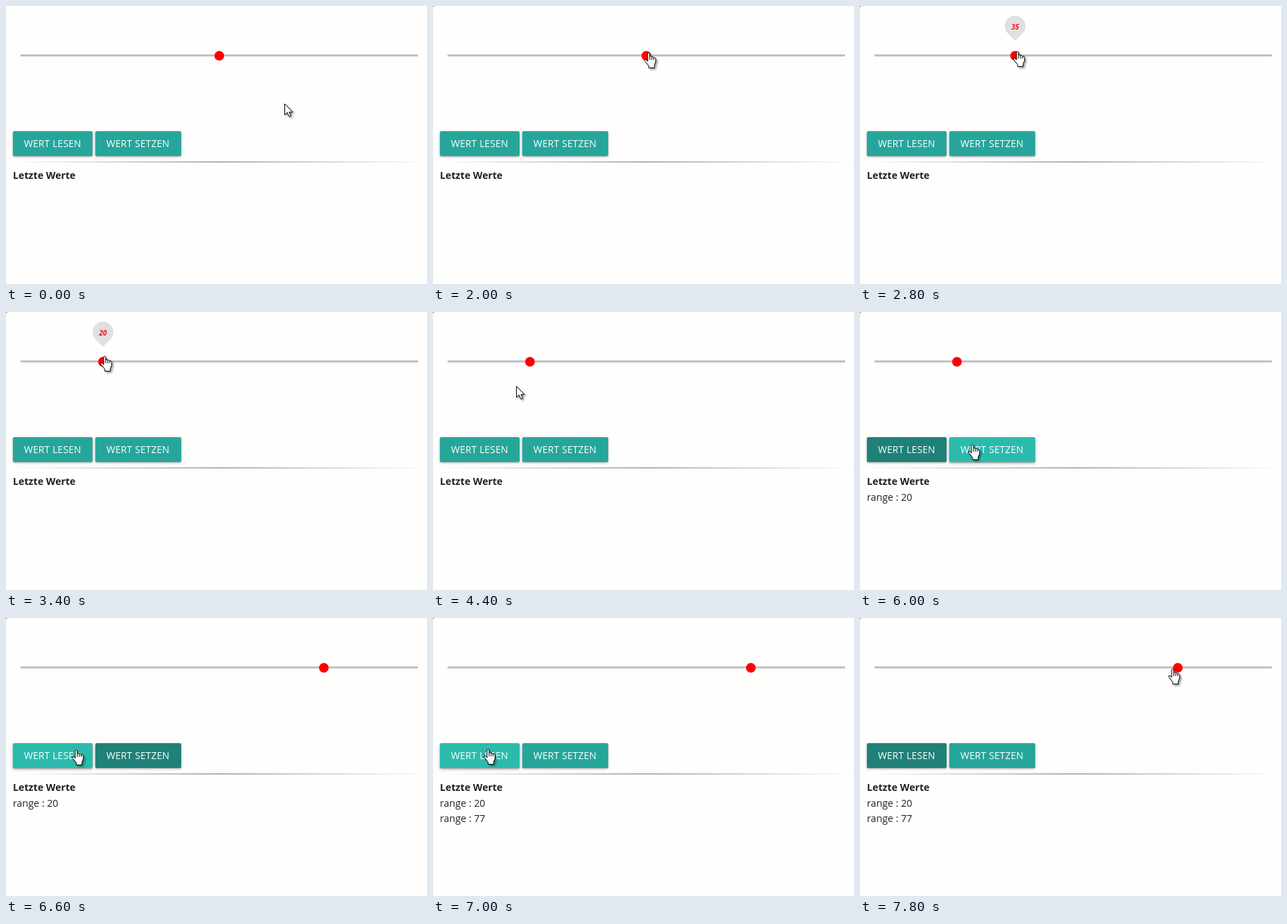
Recreate the animation shown at these times as an HTML page. Size 608x402 px, loop 8 s.

```html
<!DOCTYPE html>
<html lang="de">
<head>
<meta charset="utf-8">
<title>Schieberegler</title>
<style>
  html, body { margin: 0; width: 100%; height: 100%; overflow: hidden; background: #fefefd; }
  svg { display: block; width: 608px; height: 402px; font-family: "Open Sans", "Noto Sans", sans-serif; }
  text { white-space: pre; }
  .btn rect { fill: #26a69a; filter: drop-shadow(0 1px 1px rgba(0,0,0,.25)) drop-shadow(0 1px 2px rgba(0,0,0,.15)); }
  .btn text { fill: #fff; font-size: 13.8px; letter-spacing: .2px; }
  .btn.focus rect { fill: #1f8178; }
  .btn.hover rect { fill: #2bbbad; filter: drop-shadow(0 1px 1px rgba(0,0,0,.3)) drop-shadow(0 2px 2px rgba(0,0,0,.2)); }
  .log { font-size: 14.25px; fill: #212121; }
  #bubble text { font: italic 700 10px "Open Sans", "Noto Sans", sans-serif; fill: #f01020; text-anchor: middle; }
  #cursor { filter: drop-shadow(2.5px 2.5px 1.5px rgba(0,0,0,.4)); }
  #cursor path { fill: #fff; stroke: #000; stroke-linejoin: round; }
</style>
</head>
<body>
<svg viewBox="0 0 608 402">
  <defs>
    <linearGradient id="fade">
      <stop offset="0" stop-color="#3c5068" stop-opacity="0"/>
      <stop offset=".5" stop-color="#3c5068" stop-opacity=".8"/>
      <stop offset="1" stop-color="#3c5068" stop-opacity="0"/>
    </linearGradient>
  </defs>
  <rect id="dot" width="1" height="1"/>
  <rect x="21" y="70" width="574" height="3" fill="#c2c0c2"/>
  <circle id="thumb" cy="72" r="7" fill="#f00"/>
  <g id="bubble">
    <path d="M0 50.2L-10.6 39.6A15 15 0 1 1 10.6 39.6Z" fill="#e0e0e0"/>
    <text y="33.5"></text>
  </g>
  <g class="btn" id="read">
    <rect x="10" y="181" width="115" height="36" rx="2"/>
    <text x="26" y="204">WERT LESEN</text>
  </g>
  <g class="btn" id="set">
    <rect x="129" y="181" width="124" height="36" rx="2"/>
    <text x="145" y="204">WERT SETZEN</text>
  </g>
  <rect x="10" y="225" width="598" height="1" fill="url(#fade)"/>
  <text x="10" y="250" font-size="14.2" font-weight="700" fill="#212121">Letzte Werte</text>
  <text class="log" x="10" y="273" id="first">range : 20</text>
  <text class="log" x="10" y="295" id="second">range : 77</text>
  <g id="cursor">
    <path id="arrow" d="M.5 .5V16.5L4.2 13 7 19 9.5 18 7 12.3H12Z"/>
    <g id="hand" transform="translate(-5)">
      <path d="M5 1.8Q6.5 -.6 8 1.8V6Q9.7 5 11 6.6 12.6 6 13.8 7.6 16.2 7 16.7 9.6V14L14.7 18.5V22.5H6.7V19.5L1 12.5Q.2 9.8 2.3 10L5 13Z"/>
      <path d="M8 6V11M11 6.6V11M13.8 7.6V11" style="fill:none"/>
    </g>
  </g>
</svg>
<script>
const LOOP = 8000, STEP = 200;
const DRAG = [2200, 3400], READ_1 = 5000, SET = 6200, READ_2 = 7000;
const home = { x: 402, y: 141 };
const moves = [
  { from: 0, to: 800, x: 315, y: 69 },
  { from: 1400, to: 2000, x: 310, y: 67 },
  { from: DRAG[0], to: DRAG[1], x: 141, y: 63 },
  { from: 4000, to: READ_1, x: 81, y: 187 },
  { from: 5200, to: 6000, x: 161, y: 191 },
  { from: SET, to: 6800, x: 78, y: 189 },
  { from: READ_2, to: 7600, x: 558, y: 72 },
  { from: 7600, to: 7800, x: 450, y: 73 }
];

const $ = id => document.getElementById(id);
const show = (id, on) => $(id).style.display = on ? "" : "none";
const place = (id, x, y) => $(id).setAttribute("transform", `translate(${x} ${y})`);

function ease(from, to, t) {
  const k = Math.min(1, Math.max(0, (t - from) / (to - from)));
  return k * k * (3 - 2 * k);
}

function tipAt(t) {
  let { x, y } = home;
  for (const m of moves) {
    const k = ease(m.from, m.to, t);
    x += (m.x - x) * k;
    y += (m.y - y) * k;
  }
  return [Math.round(x), Math.round(y)];
}

function draw(t) {
  const [x, y] = tipAt(t);
  const value = t < SET ? Math.round(50 - 30 * ease(...DRAG, t)) : 77;
  const thumbX = Math.round(28 + 5.6 * value);
  const onRow = y >= 181 && y < 217;
  const over = { read: onRow && x >= 10 && x < 125, set: onRow && x >= 129 && x < 253 };
  const focus = t < READ_1 ? "" : t >= SET && t < READ_2 ? "set" : "read";
  const pointing = over.read || over.set || (y >= 62 && y < 80);

  $("thumb").setAttribute("cx", thumbX);
  place("bubble", thumbX, 0);
  $("bubble").lastElementChild.textContent = value;
  show("bubble", t >= DRAG[0] && t < 4000);
  for (const id in over) {
    $(id).classList.toggle("hover", over[id]);
    $(id).classList.toggle("focus", focus === id);
  }
  show("first", t >= READ_1);
  show("second", t >= READ_2);
  show("dot", t >= STEP);
  place("cursor", x, y);
  show("hand", pointing);
  show("arrow", !pointing);
}

function tick(now) {
  draw(Math.floor(now % LOOP / STEP) * STEP);
  requestAnimationFrame(tick);
}
tick(performance.now());
</script>
</body>
</html>
```
